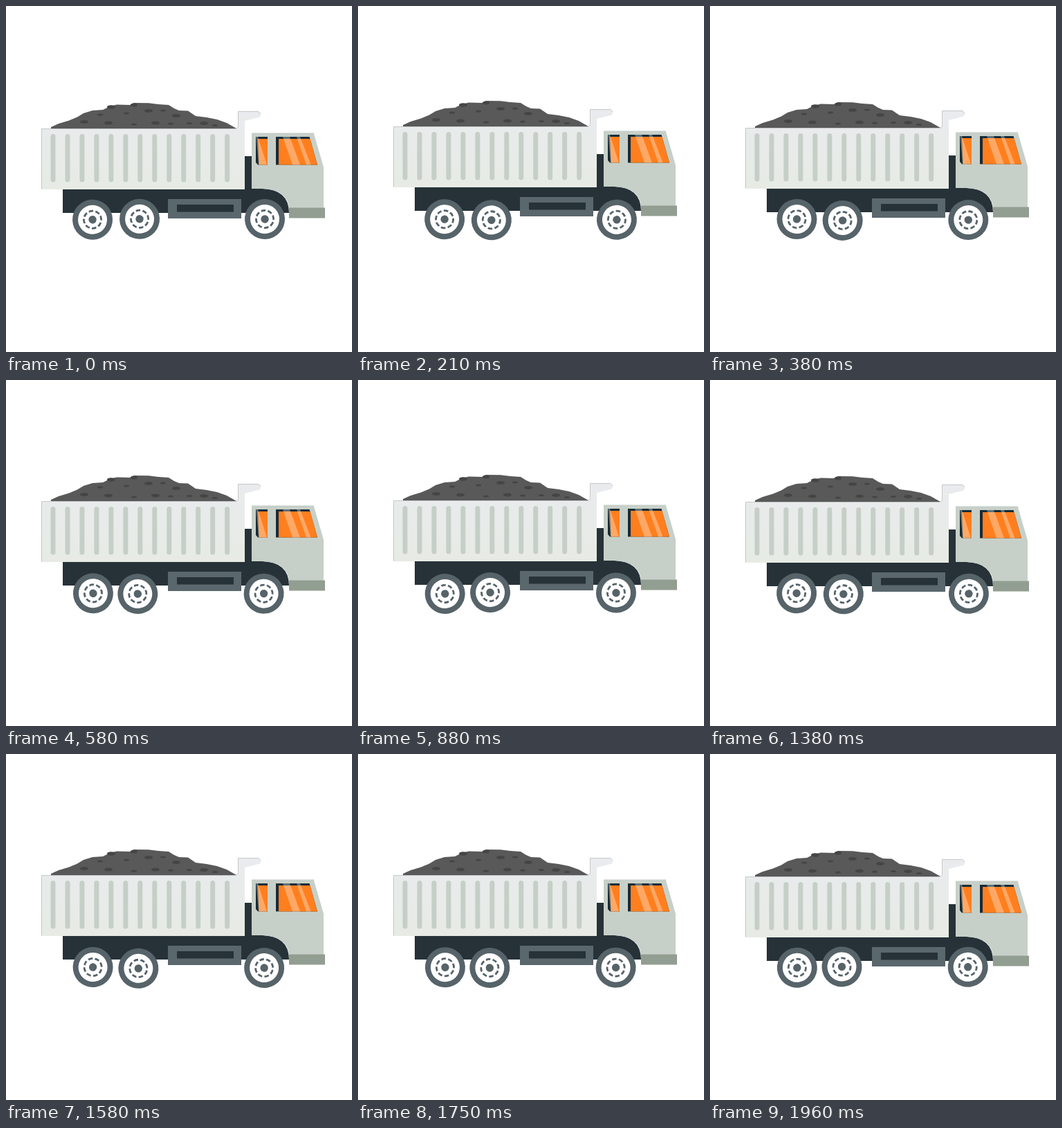
An HTML page that plays this animation: 500 px wide and 500 px high, repeating every 2000 ms.

```html
<!DOCTYPE html>
<html lang="en">
<head>
<meta charset="utf-8">
<title>Dump truck</title>
<style>
  html, body { margin: 0; width: 100%; height: 100%; overflow: hidden; background: #fff; }
  svg { display: block; width: 100vw; height: 100vh; }
</style>
</head>
<body>
<svg viewBox="0 0 500 500">
  <defs>
    <linearGradient id="cap" x2="0" y2="1">
      <stop offset="0" stop-color="#e9ebee"/>
      <stop offset="1" stop-color="#e7ebe4"/>
    </linearGradient>
    <g id="wheel">
      <circle r="29" fill="#566369"/>
      <circle r="21" fill="#fff"/>
      <circle r="12.6" fill="none" stroke="#566369" stroke-width="2.8" pathLength="80" stroke-dasharray="6.6 3.4"/>
      <circle r="5.7" fill="#566369"/>
    </g>
  </defs>
  <g id="body">
    <path fill="#263238" d="M82 264H345V217H356V264H370Q409 265 409 299H82Z"/>
    <path fill="#5a676d" d="M234 279H340V307H234Z"/>
    <path fill="#263238" d="M247 287H329V297.5H247Z"/>
    <path fill="#595959" d="M65 178V175L76 170 91 165.500 103 160.500 112 155 125 151 140 150 150 145 160 142.500 179 143 185 140 206 140.300 220 142 235 143 243 148 250 151 263 151.500 274 159 290 161 305 164 319 169 333 177V178Z"/>
    <g id="stones" fill="#454545"/>
    <path fill="url(#cap)" d="M51.500 177.500H332L335.500 175V152.500H365L368.500 155.500 367 160.500 345 166V265H51.500Z"/>
    <path fill="none" stroke="#c3c8c9" d="M51.500 264.500V177.500H332L335.500 175V152.500H365L368 156"/>
    <g id="ribs" stroke="#c6cfc7" stroke-width="7" stroke-linecap="round"/>
    <path fill="#c7d0c8" d="M355 183H444.500L459 233V292H409Q406 266 372 264H355Z"/>
    <path fill="none" stroke="#dde2df" d="M355 183.500H444.500"/>
    <path fill="#929e91" d="M409 291.500H461V306.500H409Z"/>
    <path fill="#152c38" d="M361 189H378V229.500H364L361 226ZM390 189H438.500L450 229.500H390Z"/>
    <path fill="#ff7f1e" d="M364 192H378V229.500H365.500ZM394 192H439.500L450 229.500H394Z"/>
    <path fill="#fff" fill-opacity=".32" d="M361.500 189H364L377 229.500H365ZM400 189H410L425 229.500H414ZM420 189H425L440.500 229.500H434Z"/>
  </g>
  <g id="wheels"></g>
</svg>
<script>
const byId = id => document.getElementById(id);

// x, y, rx, ry
byId('stones').innerHTML = [
  [152, 146, 6, 2.7], [185, 143, 5, 2.5], [136, 157, 4, 1.6], [174, 155, 4, 1.6], [206, 151.5, 6, 2.6],
  [227, 151, 4, 1.6], [246, 158.5, 6, 2.6], [113, 167.5, 6, 2.6], [148, 169, 6, 2.6], [185, 171, 4, 1.6],
  [216, 169, 6, 2.6], [238, 170, 4, 1.6], [265, 169.5, 4, 1.6], [286, 169.5, 6, 2.6], [302, 172.5, 4, 1.6]
].map(([x, y, rx, ry]) => `<ellipse cx="${x}" cy="${y}" rx="${rx}" ry="${ry}"/>`).join('');

byId('ribs').innerHTML = Array.from({ length: 13 }, (_, i) =>
  `<path d="M${68 + 20.97 * i} 188.500V251"/>`).join('');

// wobble: how far the hub sits off its axle; negative is the opposite side
const wheels = [
  { x: 125.5, y: 308.5, wobble: -0.5 },
  { x: 191.7, y: 308.4, wobble: 1.5 },
  { x: 373.3, y: 308.3, wobble: 0.8 }
];
byId('wheels').innerHTML = '<use href="#wheel"/>'.repeat(wheels.length);
const hubs = [...byId('wheels').children];

const LOOP = 2000, STEPS = 48, BOUNCE = 8, TURN = 28;

function draw(now) {
  const t = now % LOOP;
  const step = Math.min(STEPS - 1, Math.floor((t + 5) * STEPS / LOOP));
  const lift = Math.round(1.8 * (1 - Math.cos((step + 0.15) / BOUNCE * 2 * Math.PI)));
  byId('body').setAttribute('transform', `translate(0 ${-lift})`);

  const angle = step / TURN * 360 - 25;
  wheels.forEach(({ x, y, wobble }, i) => hubs[i].setAttribute('transform',
    `translate(${x} ${y}) rotate(${angle}) translate(${wobble} 0)`));
}

const start = performance.now();
function tick() {
  draw(performance.now() - start);
  requestAnimationFrame(tick);
}
tick();
</script>
</body>
</html>
```
